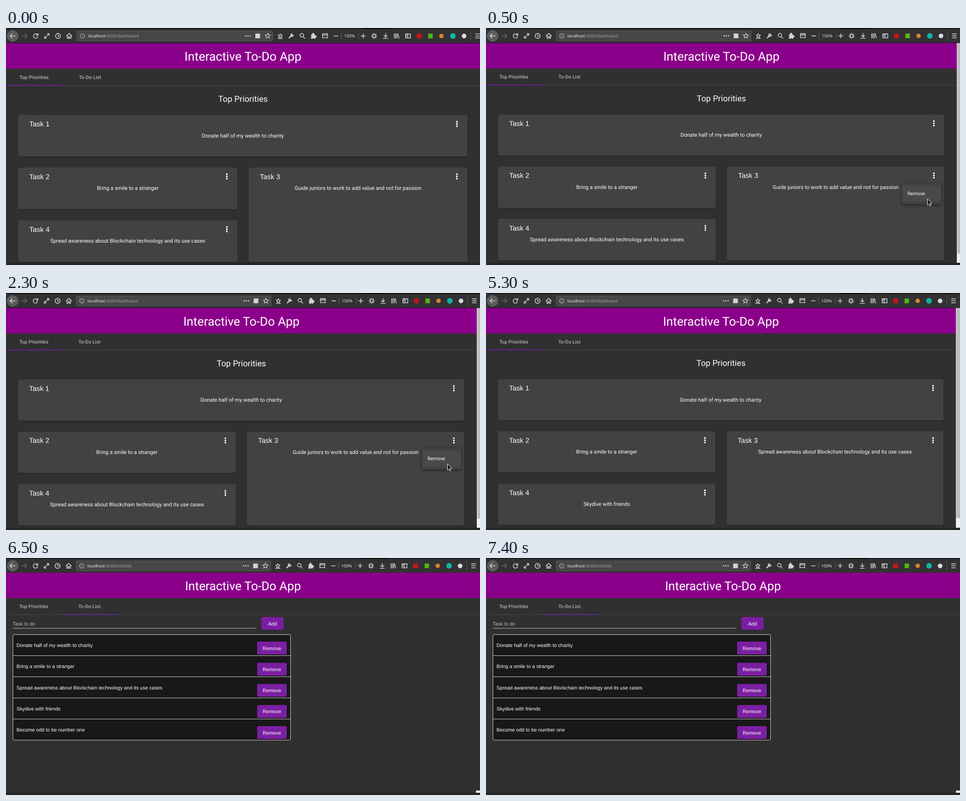
Recreate the animation shown at these times as an HTML page. Size 1057x530 px, loop 8000 ms.

```html
<!DOCTYPE html>
<html lang="en">
<head>
<meta charset="utf-8">
<title>Interactive To-Do App</title>
<style>
  html, body { margin: 0; width: 100%; height: 100%; overflow: hidden; background: #303030; }
  svg { display: block; width: 1057px; height: 530px; }
  text { fill: #fff; text-rendering: geometricPrecision; white-space: pre; }
  .app { font-family: Roboto, sans-serif; }
  .plain { font-family: "Liberation Sans", Arial, sans-serif; }
  .bar { font-family: "Noto Sans", sans-serif; }
  .icon { fill: none; stroke: #d4d4d8; stroke-width: 1.6; stroke-linecap: round; stroke-linejoin: round; }
  .card { filter: drop-shadow(0 1px 1px rgba(0, 0, 0, .35)); }
  .menu { filter: drop-shadow(0 2px 3px rgba(0, 0, 0, .5)); }
</style>
</head>
<body>
<svg id="stage" viewBox="0 0 1057 530"></svg>
<script>
const PURPLE = '#7b1fa2';
const LIGHT = '#d4d4d8';

const rect = (x, y, w, h, fill, more = '') =>
  `<rect x="${x}" y="${y}" width="${w}" height="${h}" fill="${fill}" ${more}/>`;
const dot = (x, y, r, fill) => `<circle cx="${x}" cy="${y}" r="${r}" fill="${fill}"/>`;
const text = (cls, size, x, y, str, more = '') =>
  `<text class="${cls}" font-size="${size}" x="${x}" y="${y}" ${more}>${str}</text>`;
const mid = (cls, size, x, y, str, more = '') =>
  text(cls, size, x, y, str, `text-anchor="middle" ${more}`);
const icon = (x, d, more = '') =>
  `<path class="icon" transform="translate(${x} 17.7)" d="${d}" ${more}/>`;

const star = r => 'M' + Array.from({ length: 10 }, (_, i) => {
  const a = i * Math.PI / 5, q = i % 2 ? r * .45 : r;
  return `${(q * Math.sin(a)).toFixed(2)} ${(-q * Math.cos(a)).toFixed(2)}`;
}).join('L') + 'Z';

const rays = Array.from({ length: 8 }, (_, i) => {
  const c = Math.cos(i * Math.PI / 4), s = Math.sin(i * Math.PI / 4);
  return `M${(c * 4).toFixed(2)} ${(s * 4).toFixed(2)}L${(c * 6).toFixed(2)} ${(s * 6).toFixed(2)}`;
}).join('');

const ring = r => `M${-r} 0a${r} ${r} 0 1 0 ${2 * r} 0a${r} ${r} 0 1 0 ${-2 * r} 0`;

function toolbar(path) {
  const solid = `style="fill:${LIGHT}"`;
  return rect(0, 0, 1080, 34, '#323234') + rect(0, 0, 1080, 2, '#111113') +
    rect(0, 33, 1080, 1, '#151517') + rect(798, 0, 59, 2, '#000') +
    `<circle cx="15" cy="17.7" r="12" fill="#59595c" stroke="#77777a"/>` +
    icon(15, 'M5.5 0H-5.5M-1 -5L-6 0L-1 5') +
    icon(41, 'M-5.5 0H5.5M1 -5L6 0L1 5', 'style="stroke:#69696c"') +
    icon(66, 'M4.4 -2.5A5 5 0 1 0 5 1.5M5.5 -5.5V-1.5H1.5') +
    icon(91, 'M-5 5L5 -5M1 -5H5V-1M-1 5H-5V1') +
    icon(116, ring(5.6) + 'M0 -3V0.5H2.5') +
    icon(141, 'M-6 0L0 -5.5L6 0M-4 -1V5.5H-1.3V1.5H1.3V5.5H4V-1') +
    rect(158, 6.5, 437, 22.5, '#474749', 'rx="2" stroke="#5a5a5d"') +
    icon(170.5, ring(5) + 'M0 -.2V2.5M0 -2.5V-2.4', 'style="stroke-width:1.1;stroke:#bbb"') +
    text('bar', 9.3, 183, 21.2,
      `localhost<tspan fill="#a3a3a6">:4200/${path}</tspan>`, 'style="fill:#eee"') +
    [534.5, 539.5, 544.5].map(x => dot(x, 17.7, 1.5, LIGHT)).join('') +
    rect(556, 12.5, 10.5, 10.5, LIGHT) +
    icon(583.5, star(6.2), 'style="stroke-width:1.3"') +
    icon(611.5, star(5) + 'M-5 5.8H5', 'style="stroke-width:1.4"') +
    icon(636, 'M-4.5 4.5L1 -1', 'style="stroke-width:2.4"') +
    icon(636, 'M2 -5A3.2 3.2 0 1 0 5 -2L2.8 -1L1 -2.8Z') +
    icon(661, 'M-5.2 -1.6a3.9 3.9 0 1 0 7.8 0a3.9 3.9 0 1 0 -7.8 0M1.5 1.5L5.3 5.3') +
    icon(686, 'M-5 -2.5H-2.5V-4.5A1.5 1.5 0 0 1 .5 -4.5V-2.5H3V0H4.5A1.5 1.5 0 0 1 4.5 3H3V5.5H.5V3.5H-2V5.5H-5V2.5H-3.5V0H-5Z', solid) +
    icon(711.5, 'M1 4H-5.5V-5H5.5V0M-5.5 -2H5.5M3 3.5H6M4.5 2V5') +
    icon(736, 'M-4.5 0H4.5') +
    rect(747, 11, 1, 13, '#67676a') + rect(785.5, 11, 1, 13, '#67676a') +
    mid('bar', 9.4, 766, 21.2, '100%', 'style="fill:#e4e4e6"') +
    icon(796.5, 'M-4.8 0H4.8M0 -4.8V4.8') +
    icon(821, ring(3.4) + rays) +
    icon(846.5, 'M0 -5.5V2.5M-3.5 -1L0 2.5L3.5 -1M-5 5.5H5') +
    icon(871, 'M-5 -5V5M-2 -5V5M1 -5V5M2.8 -4.5L5.5 5') +
    icon(896.5, 'M-5.5 -4.5H5.5V4.5H-5.5ZM-.5 -4.5V4.5M-3.6 -2H-2.5M-3.6 .5H-2.5') +
    dot(921.5, 17.7, 6.2, '#c4141c') + rect(941.5, 12.5, 10, 10.5, '#58b514') +
    dot(971, 17.7, 5, '#d9832b') + dot(996.5, 17.7, 6.3, '#0bb5a4') +
    dot(1021.5, 17.7, 5.2, '#dcdcde') + rect(1036, 5, 1, 25, '#58585b') +
    icon(1051.5, 'M-4.5 -4.5H4.5M-4.5 0H4.5M-4.5 4.5H4.5');
}

function header(width, tab) {
  const label = (x, str) =>
    mid('app', 11, x, 113.8, str, 'font-weight="500" style="fill:#b2b2b2"');
  return rect(0, 34, width, 57, '#8b008b') +
    mid('app', 27.4, width / 2, 73.4, 'Interactive To-Do App') +
    label(62.5, 'Top Priorities') + label(187.5, 'To-Do List') +
    rect(0, 128, width, 1, '#494949') + rect(tab * 125, 127.3, 125, 1.7, PURPLE);
}

const slots = [[27, 194.5, 1002, 93], [27, 312, 489, 93], [541, 312, 488, 211], [27, 430, 489, 93]];

function card([x, y, w, h], n, task) {
  return rect(x, y, w, h, '#424242', 'rx="3" class="card"') +
    text('plain', 15.6, x + 25, y + 25.7, `Task ${n}`) +
    mid('app', 11.83, x + w / 2, y + 50.4, task) +
    [-5, 0, 5].map(d => dot(x + w - 23.5, y + 20 + d, 1.9, '#fff')).join('');
}

function dashboard(tasks) {
  return header(1057, 0) +
    mid('app', 18.7, 528.5, 164.7, 'Top Priorities') +
    slots.map((s, i) => card(s, i + 1, tasks[i])).join('') +
    rect(1057, 34, 12, 500, '#f2f2f2') + rect(1058, 34, 10, 474, '#bdbdbd');
}

const menu = rect(928, 347, 87, 47, '#424242', 'rx="3" class="menu"') +
  rect(928, 353, 87, 35, '#494949') + text('app', 10.9, 940, 373.8, 'Remove') +
  '<path d="M984.5 382V396L987.6 393.2L989.8 398L992 397L989.9 392.3H994Z" fill="#111" stroke="#fff"/>';

function button(x, y, w, label) {
  return rect(x, y, w, 28.7, PURPLE, 'rx="3" class="card"') +
    mid('plain', 11.1, x + w / 2, y + 18.7, label);
}

function list(items) {
  const step = 47.25;
  const rows = items.map((item, i) => {
    const y = 171 + i * step;
    return (i ? rect(16, y - .4, 618, 1, '#dcdcdc') : '') +
      text('plain', 11.08, 23.5, y + 28, item) + button(560, y + 16, 66, 'Remove');
  });
  return text('plain', 11, 15, 150.7, 'Task to do', 'style="fill:#b9b9b9"') +
    rect(15, 156.6, 542, 1, '#c4c4c4') + button(569.5, 132, 49.5, 'Add') +
    rect(15.5, 171.2, 619, step * items.length - .2, '#181818', 'rx="3" stroke="#dcdcdc"') +
    rows.join('') + rect(1048, 520, 9, 5, '#f2f2f2');
}

const [donate, smile, guide, spread, dive, odd] = [
  'Donate half of my wealth to charity',
  'Bring a smile to a stranger',
  'Guide juniors to work to add value and not for passion',
  'Spread awareness about Blockchain technology and its use cases',
  'Skydive with friends',
  'Become odd to be number one'
];

const zoom = (k, body) => `<g transform="scale(${k})">${body}</g>`;
const before = toolbar('dashboard') + dashboard([donate, smile, guide, spread]);
const after = toolbar('dashboard') + dashboard([donate, smile, spread, dive]);
const todo = toolbar('todolist') + `<g transform="translate(0 -.8)">${header(1066, 1)}</g>`;

// Start time in ms and picture of each scene.
const scenes = [
  [0, zoom(1, before)],
  [500, zoom(.9933, before) + menu],
  [3500, zoom(.9914, after)],
  [6500, zoom(.9914, todo) + list([donate, smile, spread, dive, odd])]
];
const LOOP = 8000;

const stage = document.getElementById('stage');
stage.innerHTML = rect(0, 0, 1057, 530, '#303030') +
  scenes.map(s => `<g class="scene" display="none">${s[1]}</g>`).join('') +
  rect(0, 525, 1057, 5, '#252525');
const layers = [...stage.querySelectorAll('.scene')];
const start = performance.now();

function draw(now) {
  const t = Math.max(0, now - start) % LOOP;
  const current = scenes.filter(s => s[0] <= t).length - 1;
  layers.forEach((g, i) => g.setAttribute('display', i === current ? 'inline' : 'none'));
  requestAnimationFrame(draw);
}
draw(start);
</script>
</body>
</html>
```
